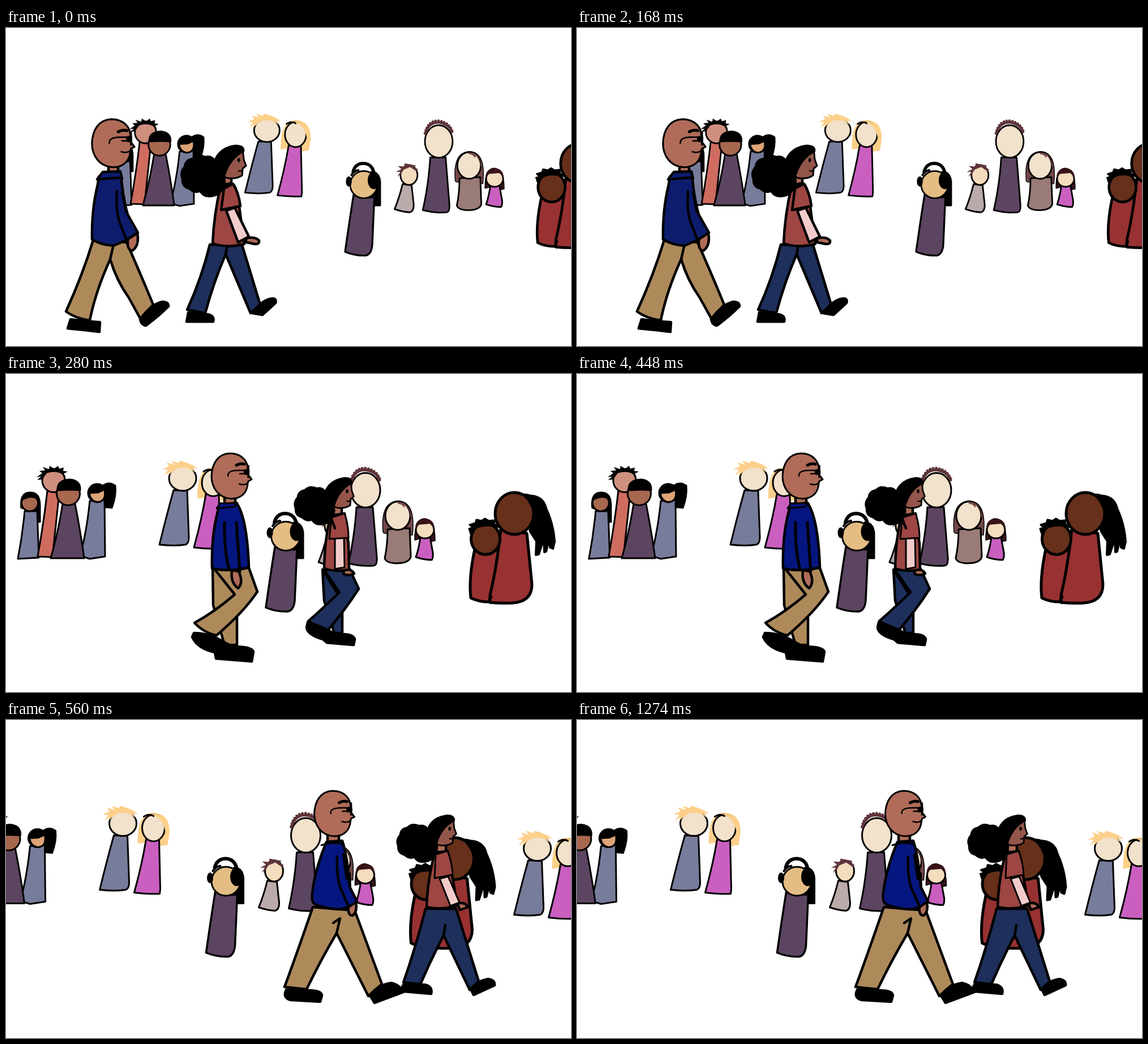
An HTML page that plays this animation: 998 px wide and 561 px high, repeating every 1750 ms.

```html
<!DOCTYPE html>
<html lang="en">
<head>
<meta charset="utf-8">
<title>Walking through a crowd</title>
<style>
  html, body { margin: 0; height: 100%; overflow: hidden; background: #fff; }
  svg { display: block; width: 100vw; height: 100vh; }
  .ink { stroke: #000; stroke-width: 3; stroke-linejoin: round; stroke-linecap: round; }
  .walker { stroke-width: 4.5; }
  .line { fill: none; }
  .bare { stroke: none; }
  .slate { fill: #787c9b; } .plum { fill: #5c4560; } .coral { fill: #cf6c60; }
  .pink { fill: #ca5fc0; } .red { fill: #983132; } .pale { fill: #f2e1cb; }
  .peach { fill: #f4dcbe; } .tan { fill: #cf8f7e; } .brown { fill: #a8674f; } .deep { fill: #66301a; }
  .blond { fill: #fcd08a; stroke: none; } .maroon { fill: #5f343a; stroke: none; }
  .skin { fill: #b06c59; } .navy { fill: #061680; } .khaki { fill: #ae8a5b; }
  .shirt { fill: #9d4643; } .sleeve { fill: #f2cccb; } .jeans { fill: #1e2f5c; }
</style>
</head>
<body>
<svg viewBox="0 0 998 561" preserveAspectRatio="none">
<defs>
  <g id="couple">
    <path class="slate" d="M296 205 Q284 248 271 301 Q298 304 317 301 Q323 299 323 288 L320 206Z"/>
    <ellipse class="pale" cx="312" cy="184" rx="24" ry="22"/>
    <path class="blond" d="M286 179 L289 173 L279 179 L286 169 L276 168 L288 163 L284 156 L297 160 L292 153 L305 157 L307 153 Q326 157 339 167 L328 166 L336 174 L321 166 L306 165 L294 172Z"/>
    <path class="blond" d="M338 220 Q337 164 366 165 Q397 167 394 203 L391 222 L377 224 L350 218Z"/>
    <path class="pink" d="M353 212 Q346 255 332 306 Q356 309 377 308 L378 300 L376 214Z"/>
    <ellipse class="pale" cx="366" cy="192" rx="20" ry="23.500"/>
    <path class="blond" d="M362 167 Q383 166 390 188 L389 209 Q386 184 374 174Z"/>
    <path class="line" d="M349 172 Q357 166 366 171"/>
  </g>

  <g id="crowd" class="ink">
    <path d="M27 236 Q24 209 43 209 Q60 209 60 232 V261 H52 L34 238Z"/>
    <path class="slate" d="M33 242 Q29 285 21 326 L58 324 L55 242Z"/>
    <path class="coral" d="M73 206 Q67 260 56 322 L82 323 L94 210Z"/>
    <circle class="brown" cx="42" cy="227.500" r="14.500"/>
    <path class="bare" d="M27 224 Q27 209 43 209 Q59 210 57 225 Q49 212 27 224Z"/>
    <ellipse class="tan" cx="84" cy="188" rx="20" ry="20.500"/>
    <path class="bare" d="M64 186 L55 187 L62 181 L54 182 L64 175 L59 171 L69 170 L65 164 L76 168 L77 162 L85 167 L92 162 L94 167 L102 165 L101 171 L109 172 L102 176 L106 182 Q92 168 72 175Z"/>
    <path class="slate" d="M148 224 Q143 275 131 321 L148 326 L175 322 L174 221Z"/>
    <path d="M171 197 Q182 189 193 197 Q195 215 187 236 L176 235Z"/>
    <circle class="bare" cx="161" cy="210" r="17.500"/>
    <path fill="#dca477" d="M147 210 L163 209 L174 204 Q178 225 161 226 Q149 224 147 210Z"/>
    <path class="plum" d="M100 229 Q92 280 79 325 L138 325 Q132 280 122 229Z"/>
    <circle class="brown" cx="110" cy="211" r="20.500"/>
    <path d="M91 205 Q90 187 113 186 Q132 188 131 205 L113 204Z"/>

    <use href="#couple"/>
    <use href="#couple" x="732" y="44"/>

    <path d="M508 262 Q523 262 525 280 V325 H516 L506 300Z"/>
    <path class="plum" d="M475 305 Q467 355 459 412 Q478 420 498 419 Q508 417 510 400 L514 309 Q495 312 475 305Z" stroke-width="3.500"/>
    <circle fill="#e4bd84" cx="494" cy="286" r="25.500"/>
    <path class="line" d="M474 262 Q478 246 494 246 Q509 247 513 263" stroke-width="6"/>
    <path class="line" d="M471 268 Q476 260 484 259" stroke-width="4"/>
    <ellipse cx="513" cy="278" rx="10" ry="15"/>
    <ellipse cx="466" cy="280" rx="4" ry="8"/>

    <path fill="#baaaa9" d="M567 285 Q561 310 552 332 Q566 337 580 338 Q588 337 588 324 L584 287Z"/>
    <ellipse class="peach" cx="579" cy="268" rx="16" ry="18.500"/>
    <path class="maroon" d="M564 266 L557 271 L563 262 L554 262 L565 257 L558 251 L570 252 L571 246 L592 250 L589 254 L596 257 L593 261 L581 253 L569 258Z"/>

    <path class="plum" d="M619 235 Q616 285 605 334 Q628 340 650 338 Q656 337 655 323 L648 235Z"/>
    <ellipse class="pale" cx="635" cy="205" rx="26" ry="30.500"/>
    <g class="line" style="stroke:#5f343a">
      <path d="M610 189 Q616 169 634 169 Q654 171 660 187" stroke-width="5"/>
      <path d="M609 190 Q614 166 634 166 Q656 169 661 188" stroke-width="5" stroke-dasharray="0 5.500"/>
    </g>

    <path fill="#734849" stroke-width="1.500" d="M666 279 Q661 225 693 224 Q724 225 718 284 L705 284 L668 281Z"/>
    <path fill="#997b77" d="M674 274 Q674 302 669 325 Q671 333 688 334 Q713 334 715 322 L713 272Z"/>
    <ellipse class="pale" cx="692" cy="250" rx="22" ry="25"/>
    <path class="bare" fill="#734849" d="M692 226 Q712 224 716 252 L714 252 Q714 237 705 231 L703 236 Q700 229 692 229Z"/>
    <path fill="#381318" stroke-width="1.500" d="M722 293 Q721 255 740 255 Q758 258 758 294 L749 296 L733 290Z"/>
    <path class="pink" d="M732 288 Q729 309 724 323 Q739 328 752 328 Q755 324 754 315 L749 288Z"/>
    <ellipse class="peach" cx="740" cy="275" rx="16" ry="15"/>
    <path class="bare" fill="#381318" d="M723 274 Q722 256 740 255 Q757 256 757 274 L751 264 L728 266Z"/>

    <g stroke-width="5">
      <path d="M914 215 Q948 211 954 237 Q967 265 969 296 L966 308 L961 306 L960 288 L954 313 L951 314 L950 290 L941 318 L936 319 L937 295 L926 278Z" stroke-width="4"/>
      <path class="red" d="M828 309 Q817 360 821 395 Q836 403 860 402 L876 310Z"/>
      <path class="red" d="M874 274 Q867 340 855 390 L855 403 Q874 405 894 404 Q929 402 929 371 L920 281Z"/>
      <ellipse class="deep" cx="898" cy="246" rx="34" ry="37"/>
      <path class="bare" d="M910 211 Q948 208 943 260 L932 275 Q937 235 910 211Z"/>
      <path class="line" d="M857 393 Q852 398 856 403"/>
      <ellipse class="deep" cx="847" cy="291" rx="25.500" ry="27.500"/>
      <path stroke-width="3" d="M821 282 L818 273 L825 271 L819 266 L829 263 L831 257 L840 259 L846 255 L853 259 L862 258 L863 265 L870 270 Q848 264 831 271Z"/>
    </g>
  </g>

  <g id="man-head">
    <path class="skin" stroke-width="3" d="M395 140 C417 140 427 154 427 168 L428 178 L434 186 L428 189 L427 193 C426 210 415 220 398 220 C375 219 363 200 363 180 C364 158 374 141 395 140Z"/>
    <path class="line" stroke-width="5" d="M407 161 Q414 157 421 159"/>
    <path class="line" stroke-width="2.500" d="M392 180 Q391 170 410 170 H429 V176 H413 M412 194 Q421 197 426 193"/>
    <path class="line" stroke-width="3.500" d="M428 162 V182"/>
    <ellipse cx="424" cy="173" rx="2" ry="3"/>
  </g>

  <g id="woman-head">
    <path d="M370 236 Q363 225 352 228 Q338 222 330 231 Q317 233 316 245 Q307 255 312 266 Q311 280 324 283 Q334 292 343 287 Q350 299 364 296 Q382 294 386 270Z"/>
    <path fill="#94564a" stroke-width="3" d="M418 212 L420 232 L424 243 L418 248 L417 260 Q405 268 388 264 L382 255 Q390 230 418 212Z"/>
    <path d="M365 252 Q369 213 405 208 Q420 208 419 217 Q394 230 385 261 L370 265Z"/>
    <ellipse cx="411" cy="233" rx="2" ry="3.500" stroke-width="1"/>
    <path class="line" stroke-width="2.500" d="M411 252 Q415 254 418 250"/>
  </g>
</defs>

<g class="pose ink">
  <use href="#crowd" transform="translate(167.500 7.500) scale(.94)"/>
  <g class="walker">
    <path class="khaki" d="M154 374 Q136 434 106 500 Q122 512 148 516 Q158 465 184 408 Q195 445 217 476 L238 514 L260 488 Q239 437 213 378Z"/>
    <path class="line" d="M184 408 L189 386"/>
    <path d="M114 514 L139 517 L166 519 L165 536 L140 533 L109 530Z"/>
    <path d="M237 514 Q255 488 276 483 Q287 483 287 491 Q270 508 247 525 Q239 524 237 514Z"/>
    <path class="skin" d="M181 240 V258 H198 V240Z"/>
    <path class="skin" d="M216 368 L232 362 Q236 384 223 393 Q212 391 216 368Z"/>
    <path class="navy" style="fill:#0e1c6e" d="M164 262 L203 259 Q207 302 215 329 L233 361 L213 374 L190 384 Q169 383 152 373 Q151 320 162 276Z"/>
    <path class="line" d="M196 288 Q193 327 204 351 L213 374 M205 290 L212 325"/>
    <path class="navy" style="fill:#0e1c6e" d="M171 254 L161 267 L200 264 L205 266 L202 253Z"/>
    <use href="#man-head" transform="translate(-233 12.500) scale(1.06)"/>

    <path class="jeans" d="M360 382 Q346 440 320 497 L352 503 Q366 450 388 399 L432 503 L449 488 L417 383Z"/>
    <path class="line" d="M388 399 L390 388"/>
    <path d="M322 502 L355 505 Q369 507 366 518 L319 518Z"/>
    <path d="M435 503 Q450 482 466 478 Q479 475 476 485 L453 506Z"/>
    <path class="skin" d="M386 259 L384 276 L398 274 V260Z"/>
    <path class="skin" d="M424 371 Q440 367 447 375 Q448 382 439 381 L424 378Z"/>
    <path class="shirt" d="M379 279 Q367 330 365 380 Q390 389 421 381 L412 315 Q409 285 401 275Z"/>
    <path class="sleeve" d="M389 322 L404 317 L429 368 L410 378Z"/>
    <path class="shirt" d="M385 283 L401 275 Q411 290 414 314 L380 321Z"/>
    <use href="#woman-head"/>
  </g>
</g>

<g class="pose ink">
  <use href="#crowd"/>
  <g class="walker">
    <path class="khaki" d="M365 342 L366 408 L386 478 H408 L408 420 L411 345Z"/>
    <path class="khaki" d="M369 345 L404 389 Q368 420 333 439 Q350 457 372 461 Q420 420 444 384 L429 342Z"/>
    <path d="M332 457 Q360 457 387 474 L400 481 Q434 480 437 490 L434 507 L371 502 L369 491 Q338 484 329 464Z"/>
    <path class="skin" d="M386 216 V234 H405 V216Z"/>
    <path class="skin" d="M399 346 Q396 368 410 378 Q420 368 411 348Z"/>
    <path class="navy" d="M377 232 L407 227 Q426 254 429 341 Q397 350 364 343 Q362 280 377 232Z"/>
    <path class="line" stroke-width="5" d="M386 262 Q385 310 394 345 M407 262 Q410 310 413 348"/>
    <path class="navy" stroke-width="3" d="M378 228 L372 237 L404 234 L409 228Z"/>
    <use href="#man-head"/>

    <path class="jeans" d="M559 345 L562 400 L580 457 H594 L594 400Z"/>
    <path class="jeans" d="M562 346 L589 385 Q559 414 534 436 L566 455 Q600 415 623 379 L607 344Z"/>
    <path d="M533 438 Q560 446 578 457 L590 459 Q614 458 616 468 L614 478 L567 474 L560 468 Q532 460 531 447Z"/>
    <path class="skin" d="M578 234 V249 H593 V234Z"/>
    <path class="skin" d="M595 345 Q609 342 615 352 Q607 357 597 353Z"/>
    <path class="shirt" d="M573 250 L598 246 L605 300 L606 345 Q582 350 562 343 Q563 290 573 250Z"/>
    <path class="sleeve" stroke-width="3" d="M581 290 L597 289 L598 341 L581 344Z"/>
    <path class="shirt" stroke-width="3" d="M575 253 L598 246 Q605 266 605 289 L571 291Z"/>
    <path class="line" d="M574 254 L581 272"/>
    <use href="#woman-head" transform="translate(226.500 -6.400) scale(.915)"/>
  </g>
</g>

<g class="pose ink">
  <use href="#crowd" x="-105.500" y="-1.500"/>
  <g class="walker">
    <path class="khaki" d="M542 330 Q518 400 492 471 L531 475 Q555 425 584 376 L640 487 L664 466 L616 336Z"/>
    <path class="line" d="M578 358 L590 350 L584 376"/>
    <path d="M495 476 L531 477 Q557 476 558 486 L555 497 L503 494 Q488 490 495 476Z"/>
    <path d="M643 486 Q655 468 680 464 Q694 466 702 480 L651 499Z"/>
    <path class="skin" d="M568 200 V217 H588 V200Z"/>
    <path class="skin" d="M605 327 L618 321 Q621 339 612 345 Q603 345 605 327Z"/>
    <path class="navy" d="M566 215 L594 213 Q603 240 607 294 L620 320 L605 330 L590 334 Q562 333 546 325 Q539 322 541 305 Q546 262 566 215Z"/>
    <path class="line" d="M585 241 Q583 285 595 306 L605 329 M596 237 L602 280"/>
    <path class="line" d="M557 221 Q575 214 594 219" stroke-width="3"/>
    <use href="#man-head" x="181.500" y="-15"/>

    <path class="jeans" d="M741 333 Q724 400 702 463 L732 466 Q752 420 773 380 L819 476 L835 461 L795 333Z"/>
    <path class="line" d="M773 380 L776 362"/>
    <path d="M703 466 L740 467 Q754 470 751 483 L704 479 Q697 472 703 466Z"/>
    <path d="M821 475 Q835 459 852 457 Q864 459 863 468 L826 485Z"/>
    <path class="skin" d="M762 216 L760 233 H777 V216Z"/>
    <path class="skin" d="M797 324 Q811 320 816 330 L802 335Z"/>
    <path class="shirt" d="M757 235 L780 231 L790 285 L797 327 Q770 336 743 330 Q744 285 757 235Z"/>
    <path class="sleeve" stroke-width="3" d="M766 280 L781 276 L801 322 L785 328Z"/>
    <path class="shirt" stroke-width="3" d="M759 237 L780 231 Q788 252 789 273 L757 279Z"/>
    <use href="#woman-head" transform="translate(407.500 -21.400) scale(.915)"/>
  </g>
</g>
</svg>
<script>
  const poses = document.querySelectorAll('.pose');
  const LOOP = 1750, STEP = 280;

  function draw() {
    const time = performance.now() % LOOP;
    const current = Math.min(Math.floor(time / STEP), poses.length - 1);
    poses.forEach((pose, i) => { pose.style.display = i === current ? '' : 'none'; });
    requestAnimationFrame(draw);
  }
  draw();
</script>
</body>
</html>
```
